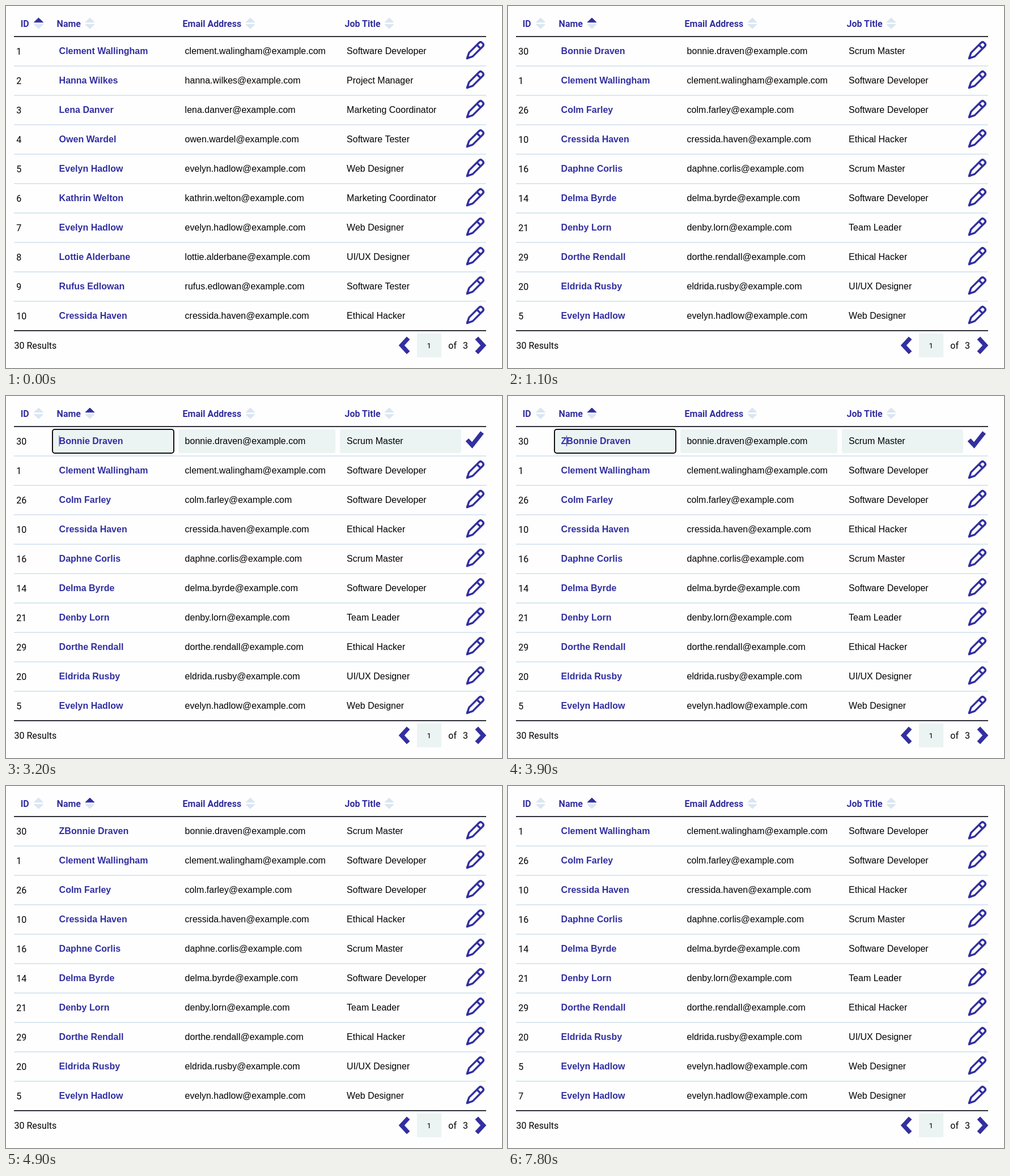
These frames come from a looping animation (875 px wide and 640 px high, 8 s). An HTML page:

```html
<!DOCTYPE html>
<html lang="en">
<head>
<meta charset="utf-8">
<title>Sortable staff table</title>
<style>
html, body { margin: 0; width: 100%; height: 100%; overflow: hidden; background: #fefefe; }
svg { display: block; }
text { font: 16px "Liberation Sans", Arial, sans-serif; fill: #000; white-space: pre; }
.ui { font-family: Roboto, sans-serif; }
.head { font: bold 16px Roboto, sans-serif; fill: #322fa0; }
.name { font-weight: bold; fill: #322fa0; }
.page { font: 13.3px Roboto, sans-serif; text-anchor: middle; }
.icon { fill: none; stroke: #322fa0; }
</style>
</head>
<body>
<svg id="stage" width="875" height="640" viewBox="0 0 875 640"></svg>
<script>
const INK = '#322fa0', PALE = '#dae6f1', FIELD = '#ecf3f3', DARK = '#2f2f38';
const LOOP = 8000, TOP = 54, STEP = 52;

const people = {};
`1|Clement Wallingham|Software Developer|clement.walingham
2|Hanna Wilkes|Project Manager
3|Lena Danver|Marketing Coordinator
4|Owen Wardel|Software Tester
5|Evelyn Hadlow|Web Designer
6|Kathrin Welton|Marketing Coordinator
7|Evelyn Hadlow|Web Designer
8|Lottie Alderbane|UI/UX Designer
9|Rufus Edlowan|Software Tester
10|Cressida Haven|Ethical Hacker
14|Delma Byrde|Software Developer
16|Daphne Corlis|Scrum Master
20|Eldrida Rusby|UI/UX Designer
21|Denby Lorn|Team Leader
26|Colm Farley|Software Developer
29|Dorthe Rendall|Ethical Hacker
30|Bonnie Draven|Scrum Master`.split('\n').forEach(line => {
  const [id, name, job, user = name.toLowerCase().replace(' ', '.')] = line.split('|');
  people[id] = { id, name, job, email: user + '@example.com' };
});

const byId = [1, 2, 3, 4, 5, 6, 7, 8, 9, 10];
const byName = [30, 1, 26, 10, 16, 14, 21, 29, 20, 5];
const renamed = [...byName.slice(1), 7];

// [label, text x, arrow centre x]
const columns = [['ID', 25.7, 57.5], ['Name', 89.6, 148], ['Email Address', 311.6, 431], ['Job Title', 597.6, 676]];

// Each step changes part of the state at its time.
const steps = [
  [0, { rows: byId, sort: 0, edit: false, focus: false, caret: false, typed: '' }],
  [1100, { rows: byName, sort: 1 }],
  [2200, { edit: true }],
  [3200, { focus: true, caret: true }],
  [3700, { typed: 'Z' }],
  [4200, { caret: false }],
  [4500, { focus: false }],
  [4600, { edit: false }],
  [5900, { sort: 2 }],
  [7800, { rows: renamed, sort: 1 }]
];

const text = (x, y, s, cls = '') => `<text x="${x}" y="${y}" class="${cls}">${s}</text>`;
const box = (x, y, w, h, fill, more = '') =>
  `<rect x="${x}" y="${y}" width="${w}" height="${h}" fill="${fill}" ${more}/>`;
const line = (points, w) => `<polyline class="icon" stroke-width="${w}" points="${points}"/>`;
const rule = (y, color) => box(14, y - 1, 833, 2, color);

function triangle(x, base, tip, color) {
  return `<path d="M${x - 8} ${base}H${x + 8}L${x} ${tip}Z" fill="${color}"
    stroke="${color}" stroke-linejoin="round"/>`;
}

function header([label, x, cx], active) {
  return text(x, 36.5, label, 'head') +
    triangle(cx, 28.8, 21, active ? INK : PALE) + triangle(cx, 32.5, 40.2, PALE);
}

function pencil(y) {
  return `<g class="icon" stroke-width="3.5" stroke-linejoin="round"
    transform="translate(813.4 ${y + 38.6}) rotate(-45)">
    <path d="M0 0L9.5 -4.6H34.5Q38.2 -4.6 38.2 -1V1Q38.2 4.6 34.5 4.6H9.5ZM29 -4.6V4.6"/>
    <path d="M0 0L4 -2V2Z" fill="${INK}" stroke-width="1"/></g>`;
}

const check = y => line(`813.5,${y + 23.5} 822.3,${y + 33} 840,${y + 10.5}`, 7.5);

function fields(focus) {
  return box(82, 59, 214, 42, FIELD, 'rx="4"') +
    box(304, 59, 277, 42, FIELD, 'rx="4"') +
    box(589, 59, 214, 42, FIELD, 'rx="4"') +
    (focus ? box(82, 59, 214, 42, 'none', 'rx="4" stroke="#111" stroke-width="2"') : '');
}

function row(id, i, s) {
  const p = people[id], y = TOP + i * STEP, base = y + 31.4;
  const editing = s.edit && i === 0;
  return (editing ? fields(s.focus) : '') +
    text(18.3, base + .2, p.id, 'ui') +
    text(93.6, base, (id === 30 ? s.typed : '') + p.name, 'name') +
    text(315.6, base, p.email) +
    text(601.1, base, p.job) +
    (editing && s.caret ? box(s.typed ? 103 : 93.5, y + 16, 1, 19, INK) : '') +
    (editing ? check(y) : pencil(y));
}

function footer() {
  return text(14.5, 605.6, '30 Results', 'ui') +
    line('709.7,587 697.8,600 709.7,613', 7.5) +
    box(725, 579, 43, 42, FIELD) +
    text(746.3, 604.7, '1', 'page') +
    text(780.3, 605.6, 'of', 'ui') + text(806, 605.6, '3', 'ui') +
    line('830.3,587 842.2,600 830.3,613', 7.5);
}

function draw(s) {
  const rules = byId.map((_, i) => rule(TOP + i * STEP, i ? PALE : DARK)).join('');
  return box(0, 0, 875, 640, '#fefefe') +
    columns.map((c, i) => header(c, i === s.sort)).join('') +
    rules + rule(TOP + 10 * STEP, DARK) +
    s.rows.map((id, i) => row(id, i, s)).join('') + footer();
}

const stage = document.getElementById('stage');
let shown = 0;

function render(t) {
  const past = steps.filter(([at]) => at <= t);
  if (past.length === shown) return;
  shown = past.length;
  stage.innerHTML = draw(Object.assign({}, ...past.map(([, change]) => change)));
}

const start = performance.now();
function tick() {
  render((performance.now() - start) % LOOP);
  requestAnimationFrame(tick);
}
tick();
</script>
</body>
</html>
```
